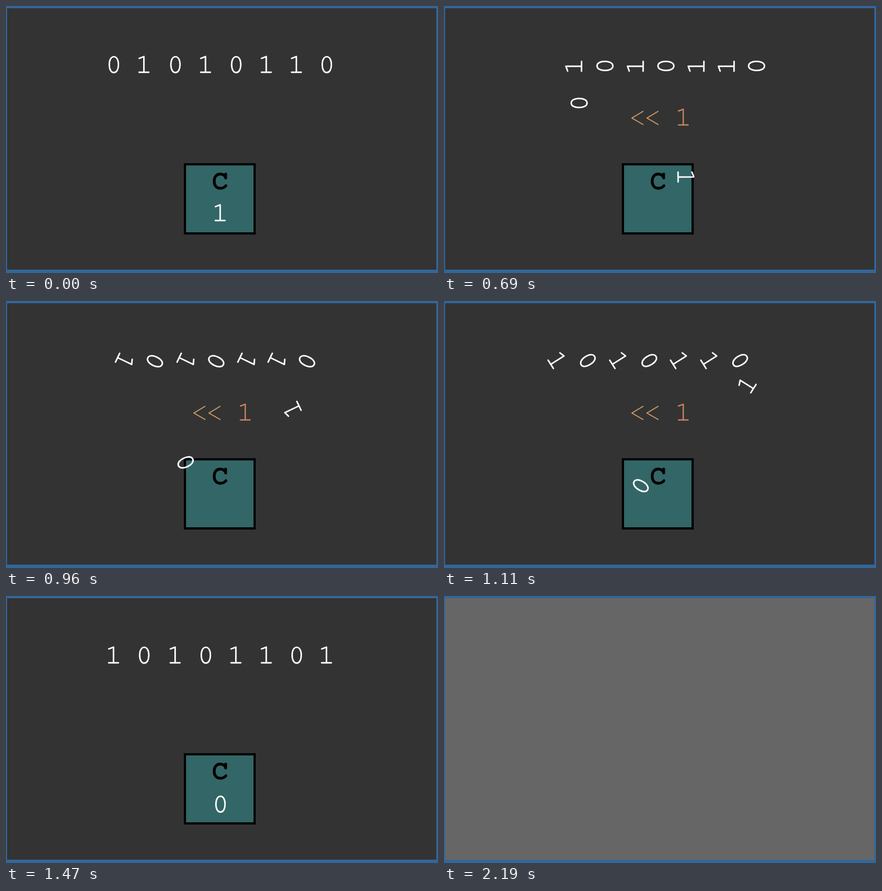
Recreate the animation shown at these times as an HTML page with a canvas. Size 775 px wide and 479 px high, loop 2.28 s.

```html
<!DOCTYPE html>
<html lang="en">
<head>
<meta charset="utf-8">
<title>Rotate left through carry</title>
<style>
html, body { margin: 0; width: 100%; height: 100%; overflow: hidden; background: #336699; }
canvas { display: block; }
</style>
</head>
<body>
<canvas id="stage" width="775" height="479" role="img" aria-label="0 1 0 1 0 1 1 0, C 1, &lt;&lt; 1"></canvas>
<script>
const ctx = document.getElementById('stage').getContext('2d');
const LOOP = 2280, STEP = 30, START = 570, END = 1470, FLASH = 2100, DIM = 2190;
const bits = '01010110';
const slots = [193.5, 248, 304, 358.5, 413, 467.5, 521.5, 575.5];
const rowY = 107.5, carryX = 384.8;

function rect(color, x, y, w, h) {
  ctx.fillStyle = color;
  ctx.fillRect(x, y, w, h);
}

function pen(color, width) {
  ctx.strokeStyle = color;
  ctx.lineWidth = width;
  ctx.lineCap = ctx.lineJoin = 'round';
}

function line(...p) {
  ctx.moveTo(p[0], p[1]);
  for (let i = 2; i < p.length; i += 2) ctx.lineTo(p[i], p[i + 1]);
}

function zero() {
  const a = 8.2, b = 14.2, k = 0.6, y = -1.3;
  ctx.moveTo(0, y - b);
  ctx.bezierCurveTo(a * k, y - b, a, y - b * k, a, y);
  ctx.bezierCurveTo(a, y + b * k, a * k, y + b, 0, y + b);
  ctx.bezierCurveTo(-a * k, y + b, -a, y + b * k, -a, y);
  ctx.bezierCurveTo(-a, y - b * k, -a * k, y - b, 0, y - b);
}

function one() {
  line(-9.2, -12.6, -0.6, -15.8, -0.6, 12.3);
  line(-9.3, 12.3, 8.2, 12.3);
}

function digit(d, x, y, turn = 0) {
  ctx.save();
  ctx.translate(x, y);
  ctx.rotate(turn * Math.PI * 2);
  ctx.beginPath();
  d === '0' ? zero() : one();
  ctx.stroke();
  ctx.restore();
}

function carryBox() {
  rect('#000', 319, 282, 129, 128);
  rect('#336666', 323, 286, 121, 120);
  pen('#000', 5);
  ctx.beginPath();
  line(394, 301.5, 394, 308.5);
  ctx.moveTo(394, 307);
  ctx.bezierCurveTo(391.5, 303, 388, 301.5, 384.5, 301.5);
  ctx.bezierCurveTo(377.5, 301.5, 373.5, 306.5, 373.5, 314.5);
  ctx.bezierCurveTo(373.5, 322.5, 378, 327, 385, 327);
  ctx.bezierCurveTo(389, 327, 392, 325.5, 394.5, 322.5);
  ctx.stroke();
}

function operator() {
  pen('#cc9966', 2);
  ctx.beginPath();
  line(357, 189, 337, 201, 357, 212.5);
  line(384, 189, 364, 201, 384, 212.5);
  ctx.stroke();
  pen('#d08a62', 2.2);
  digit('1', 429.8, 201);
}

const mix = (a, b, u) => a + (b - a) * u;

function draw(time) {
  const t = Math.floor(time / STEP) * STEP;
  rect('#336699', 0, 0, 775, 479);
  rect(t >= DIM ? '#666' : t >= FLASH ? '#999' : '#333', 2, 4, 770, 469);
  if (t >= FLASH) return;

  carryBox();
  if (t > START && t < END) operator();

  const p = Math.min(1, Math.max(0, (t - START) / (END - START)));
  const u = 1 - (1 - p) ** 2;
  const lift = t < START ? 1 : 0;

  pen('#fff', 2.7);
  // the row spins left, the two carried bits spin right
  for (let i = 1; i < 8; i++) {
    digit(bits[i], mix(slots[i], slots[i - 1], u), rowY - lift, -u);
  }
  digit(bits[0], mix(slots[0], carryX, u), mix(rowY, 374.8, u) - lift, u);
  digit('1', mix(carryX, slots[7], u), mix(373.5, rowY, u) - lift, u);
}

const begin = performance.now();
function tick() {
  draw((performance.now() - begin) % LOOP);
  requestAnimationFrame(tick);
}
tick();
</script>
</body>
</html>
```
